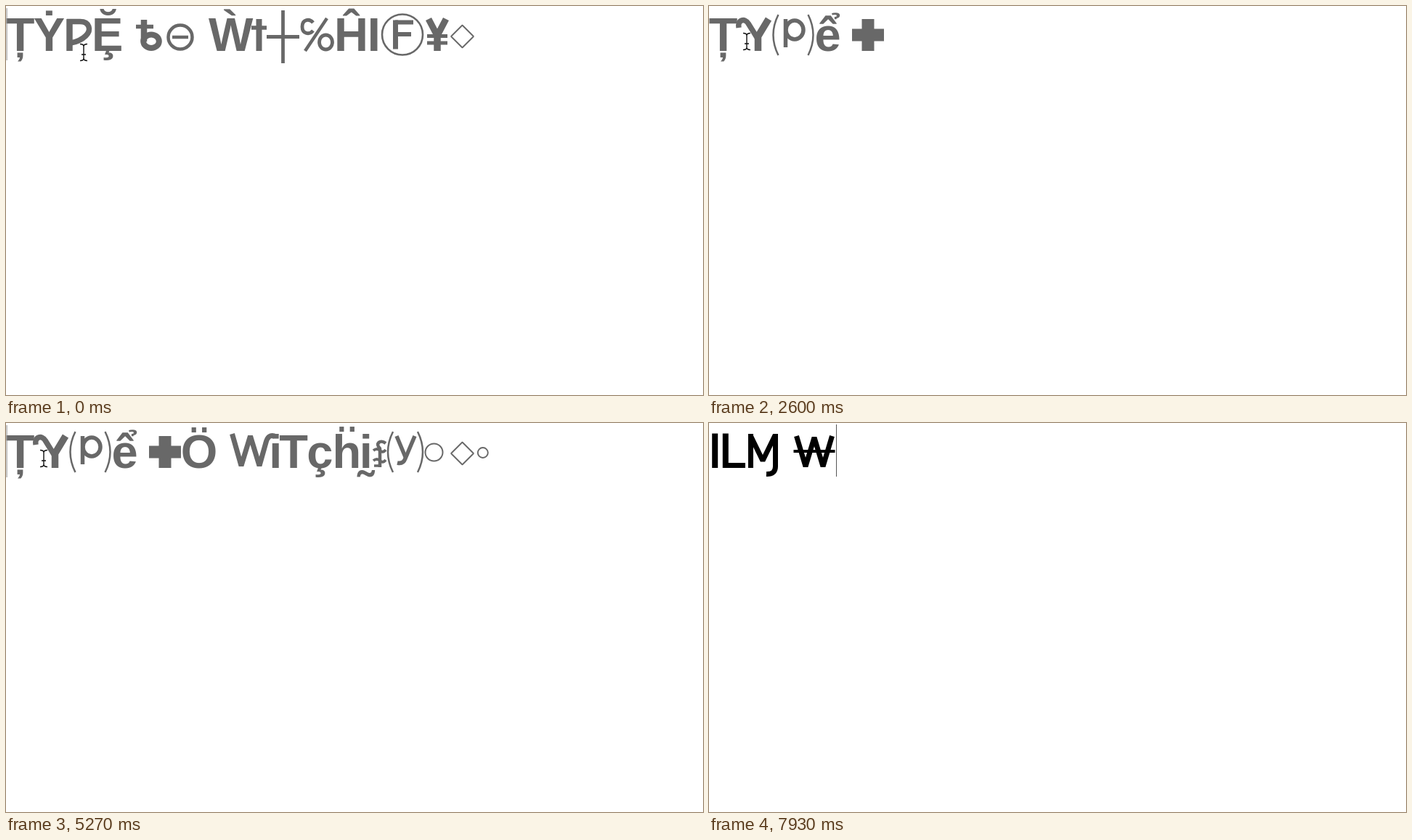
Recreate the animation shown at these times as an HTML page with a canvas. Size 960 by 537 pixels, loop 8000 ms.

```html
<!DOCTYPE html>
<html lang="en">
<head>
<meta charset="utf-8">
<title>Shifting letters</title>
<style>
  html, body { margin: 0; width: 100%; height: 100%; overflow: hidden; background: #fff; }
  canvas { display: block; }
</style>
</head>
<body>
<canvas id="stage" width="960" height="537"></canvas>
<script>
const ctx = document.getElementById('stage').getContext('2d');
const LOOP = 8000, BASE = 62;
const GRAY = '#686868', BLACK = '#000';

// Glyph makers: each returns a function that draws one character.
const letter = (ch, x) => () => ctx.fillText(ch, x, BASE);
const strokes = (...parts) => {
  const paths = parts.map(([d, w]) => [new Path2D(d), w]);
  return () => {
    for (const [path, w] of paths) {
      ctx.lineWidth = w;
      ctx.stroke(path);
    }
  };
};
const oval = (x, y, rx, ry, w) => () => {
  ctx.lineWidth = w;
  ctx.beginPath();
  ctx.ellipse(x, y, rx, ry, 0, 0, Math.PI * 2);
  ctx.stroke();
};
const ring = (x, y, r, w) => oval(x, y, r, r, w);
const group = (...fns) => () => fns.forEach(fn => fn());

const diamond = strokes(['M613 42L628.5 26.5L644 42L628.5 57.5Z', 1.8]);
const smallDot = ring(656.8, 41, 7, 1.9);

// [time typed, draw]
const first = [
  [0, letter('Ț', -0.3)],
  [0, letter('Ẏ', 37.7)],
  [0, strokes(['M87.5 62V18', 8.5], ['M84 21.5H102C115 21.5 118 33 110 41Q102 49 89 51', 7.5])],
  [0, letter('Ḝ', 118)],
  [0, group(strokes(['M190 19V49', 8.5], ['M179 28.5H203', 5.5]), oval(200, 48.7, 10.8, 9.3, 8))],
  [0, group(ring(240, 43, 16.5, 4.5), strokes(['M229 43H251', 4.5]))],
  [0, letter('Ẁ', 279)],
  [0, strokes(['M348.5 18V62', 8], ['M338 30H359', 5.5])],
  [0, strokes(['M381.5 6V79', 4.8], ['M359 42.5H404', 4.8])],
  [0, group(
    strokes(['M423 23C418 17 408 18 408 28.5C408 39 418 40 423 34', 4.8], ['M412 62L442 17', 4.5]),
    oval(440.5, 50, 9, 10, 4.8))],
  [0, letter('Ĥ', 452)],
  [0, letter('I', 497.7)],
  [0, group(ring(546, 39.5, 28, 2.6), strokes(['M536.5 59.5V19.5', 7], ['M536 22.5H561', 6], ['M536 39H558', 6]))],
  [0, strokes(['M582 18L594 41L606 18', 9], ['M594 39V62', 9.5], ['M580 41.5H608', 5], ['M580 51H608', 5])],
  [0, diamond],
  [200, smallDot],
  [400, ring(679, 41, 7, 1.9)]
];

const second = [
  [1600, letter('Ț', -0.3)],
  [1800, strokes(['M67.5 62V42L82 18', 9.5], ['M67 45L54 24C50 17 39 18 41 30', 7.5])],
  [2000, group(
    strokes(['M95.5 12Q81.5 40 95.5 68', 2.5], ['M136.5 12Q150.5 40 136.5 68', 2.5], ['M105.5 18V57', 5.5]),
    oval(118, 33, 12, 13, 5.5))],
  [2200, letter('ể', 145.5)],
  [2600, strokes(['M219 18V62', 17], ['M197 40H241', 17])],
  [2800, letter('Ö', 240.7)],
  [3200, strokes(['M311.5 15L324 59L336.5 18L349 59L358 27Q361 15 370 18', 7])],
  [3400, letter('i', 362.3)],
  [3600, letter('T', 376.2)],
  [3800, letter('ç', 414.2)],
  [4000, letter('ḧ', 449.5)],
  [4200, letter('ḭ', 486.8)],
  [4400, strokes(['M523 28C515 22 508 29 515 35V61', 4.5],
    ['M506 38Q511 34 515 38T523 37', 4], ['M506 52Q511 48 515 52T523 51', 4], ['M507 59H516', 3.5])],
  [4600, strokes(['M533 12Q519 40 533 68', 2.5], ['M567 12Q581 40 567 68', 2.5],
    ['M538 18L550.5 48', 5.5], ['M563 18L550 49Q547 57 539 55', 5.5])],
  [4800, ring(589.5, 40.5, 12, 2)],
  [5000, diamond],
  [5270, smallDot]
];

const third = [
  [5600, strokes(['M8.2 14.5V62', 8], ['M22.8 14.5V62', 8], ['M20 58.5H50', 7])],
  [6670, strokes(['M57.5 62V15', 7], ['M57 17L74 52L91 17', 7],
    ['M91.5 15V60Q91.5 71 79 70.5', 7])],
  [7930, strokes(['M120.5 18L133 60L145 20L157 60L169.5 18', 7], ['M116.5 39H173.5', 4])]
];

// Caret visibility as [from, to, x]
const carets = [
  [0, 530, 0.6], [1070, 1530, 0.6], [2000, 2530, 0.6], [3000, 3530, 0.6],
  [4000, 4530, 0.6], [5000, 5530, 0.6],
  [5600, 6130, 51], [6600, 6670, 51], [6670, 7000, 98], [7130, 7670, 115], [7930, LOOP, 175]
];

const beam = new Path2D('M-5 -11.5Q0 -11.5 0 -8Q0 -11.5 5 -11.5M0 -8V8M-5 11.5Q0 11.5 0 8Q0 11.5 5 11.5M-3 3H3');

function drawPointer(t) {
  const step = Math.floor((t + 5) * 15 / 1000);
  const k = Math.min(1, step / 9);
  const e = k * k * (3 - 2 * k);
  ctx.save();
  ctx.translate(107 - 55 * e, 64 - 15 * e);
  ctx.strokeStyle = '#fff';
  ctx.lineWidth = 3.4;
  ctx.stroke(beam);
  ctx.strokeStyle = '#111';
  ctx.lineWidth = 1.4;
  ctx.stroke(beam);
  ctx.restore();
}

function draw(t) {
  const closing = t >= 5600;
  const line = t < 1600 ? first : closing ? third : second;
  ctx.fillStyle = '#fff';
  ctx.fillRect(0, 0, 960, 537);
  ctx.font = 'bold 65px "Liberation Sans", Arial, sans-serif';
  ctx.fillStyle = ctx.strokeStyle = closing ? BLACK : GRAY;
  ctx.lineJoin = 'bevel';
  for (const [at, glyph] of line) if (t >= at) glyph();

  ctx.fillStyle = closing ? '#555' : '#8c8c8c';
  for (const [from, to, x] of carets) {
    if (t >= from && t < to) ctx.fillRect(x, closing ? 2 : 3, 1, 72);
  }
  if (!closing) drawPointer(t);
}

const start = performance.now();
function tick() {
  draw((performance.now() - start) % LOOP);
  requestAnimationFrame(tick);
}
tick();
</script>
</body>
</html>
```
